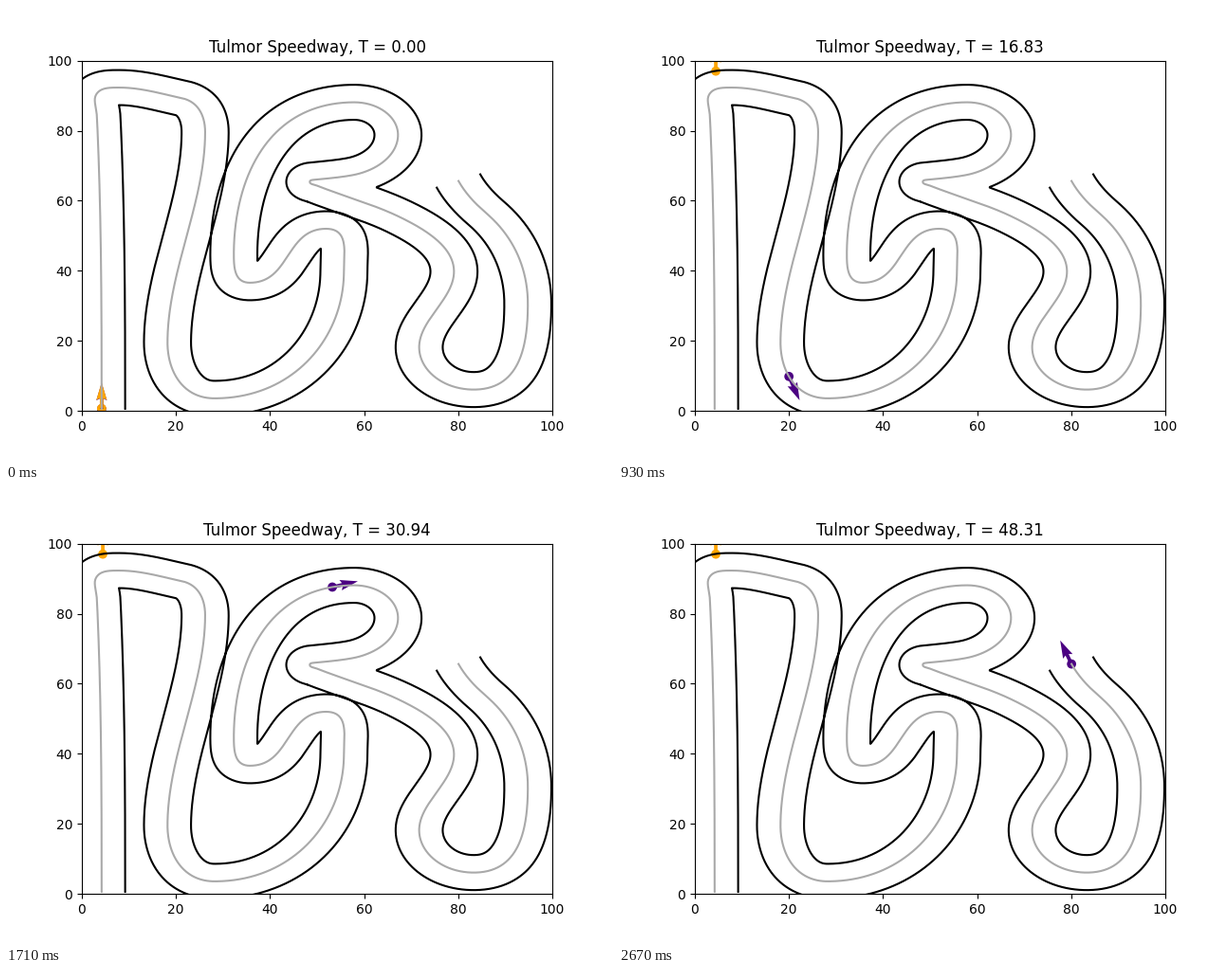
A matplotlib script for the animation above (2.7 s loop, 640 px wide and 480 px high).

```python
import numpy as np
import matplotlib.pyplot as plt
from matplotlib.animation import FuncAnimation

FRAMES, STEP = 90, 0.5428
HALF_WIDTH = 5

# Centre line nodes: x, y, direction in degrees
NODES = [
    (4.2, 0.6, 90), (3.2, 84, 92), (2.75, 88.8, 90), (3.6, 91.2, 48), (8, 92.3, 0),
    (21.2, 89.3, -16), (26.2, 79.6, -90), (18.2, 19.5, -90), (28.2, 3.6, 0),
    (55.7, 39.8, 90), (51.9, 52, 180), (35.7, 36.6, 180), (32.3, 44.7, 90),
    (57.9, 88.1, 0), (67.2, 78.8, -90), (57.5, 67.3, 194), (50, 66.05, 188),
    (48.45, 65.4, -90), (50, 64.3, -28), (67.5, 55.4, -33), (79.1, 39.8, -90),
    (71.7, 18.2, -90), (83.3, 6.1, 0), (94.8, 30.6, 90), (86, 56.4, 131),
    (80, 65.8, 112),
]


def handle(a, b):
    """Hobby's relative handle length for end angles a and b."""
    bend = (np.sin(a) - np.sin(b) / 16) * (np.sin(b) - np.sin(a) / 16)
    top = 2 + np.sqrt(2) * bend * (np.cos(a) - np.cos(b))
    r = np.sqrt(5)
    return top / (3 + 1.5 * (r - 1) * np.cos(a) + 1.5 * (3 - r) * np.cos(b))


def segment(start, end):
    """Points and unit tangents, as complex numbers, between two nodes."""
    p, q = complex(*start[:2]), complex(*end[:2])
    a, b = np.radians([start[2], end[2]])
    size, turn = abs(q - p), np.angle(q - p)
    c = p + handle(a - turn, turn - b) * size * np.exp(1j * a)
    d = q - handle(turn - b, a - turn) * size * np.exp(1j * b)
    t = np.linspace(0, 1, 20 + int(4 * size), endpoint=False)
    u = 1 - t
    points = u**3 * p + 3 * u**2 * t * c + 3 * u * t**2 * d + t**3 * q
    slope = u**2 * (c - p) + 2 * u * t * (d - c) + t**2 * (q - d)
    return points, slope / abs(slope)


pieces = [segment(*pair) for pair in zip(NODES, NODES[1:])]
track, tangent = (np.concatenate(part) for part in zip(*pieces))
length = np.r_[0, np.cumsum(abs(np.diff(track)))]


def border(side):
    """Parallel line with the loops on the inside of tight bends cut off."""
    edge = track + side * HALF_WIDTH * 1j * tangent
    gap = abs(edge[:, None] - track)
    gap[abs(length[:, None] - length) > 45] = np.inf
    return edge[gap.min(axis=1) > HALF_WIDTH - 0.02]


def leader_pos(t):
    return np.interp(t * length[-1] / (STEP * (FRAMES - 1)), length, track)


def leader_heading(t):
    return np.angle(leader_pos(t + STEP / 2) - leader_pos(t - STEP / 2))


def chaser_pos(t):
    y = min(0.7 + 6.07 * t, 97)
    return complex(4.2 + 0.25 * (y / 97)**2, y)


def draw(line, color):
    ax.plot(line.real, line.imag, color=color)


fig, ax = plt.subplots(figsize=(6.4, 4.8), dpi=100)
draw(track, "darkgray")
for side in (1, -1):
    draw(border(side), "black")

colors = ["indigo", "orange"]
dots = ax.scatter([0, 0], [0, 0], c=colors)
arrows = ax.quiver([0, 0], [0, 0], [0, 0], [1, 1], color=colors,
                   scale=18, width=0.0075)
ax.set_xlim(0, 100)
ax.set_ylim(0, 100)
title = ax.set_title("")


def update(frame):
    t = frame * STEP
    cars = np.array([leader_pos(t), chaser_pos(t)])
    angle = np.array([leader_heading(t), np.pi / 2])
    for artist in (dots, arrows):
        artist.set_offsets(np.column_stack([cars.real, cars.imag]))
    arrows.set_UVC(np.cos(angle), np.sin(angle))
    title.set_text(f"Tulmor Speedway, T = {t:.2f}")
    return dots, arrows, title


anim = FuncAnimation(fig, update, frames=FRAMES, interval=30, repeat=True,
                     repeat_delay=0, blit=False)
plt.show()
```
